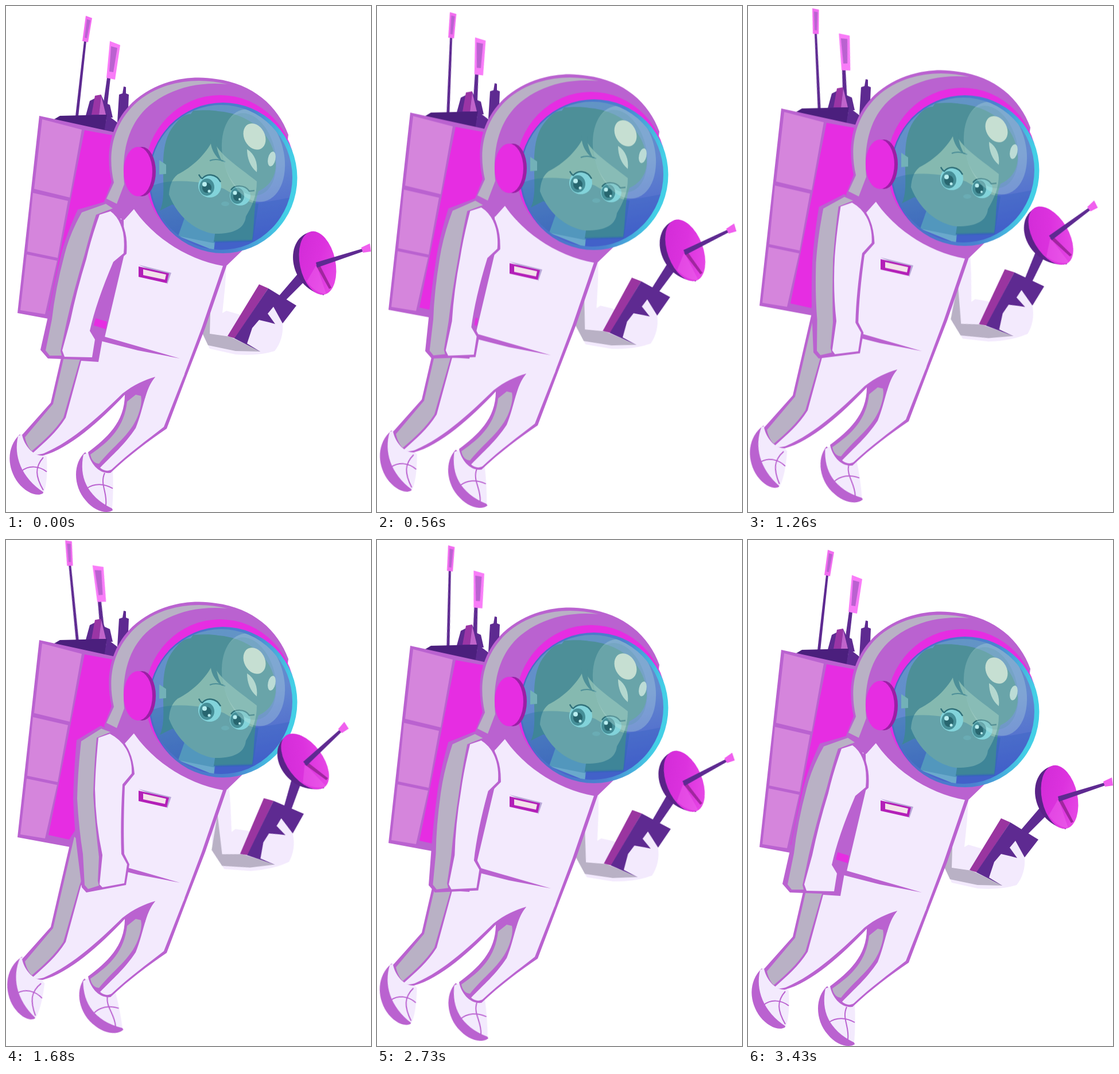
Write an HTML page that moves like this. It is 636x880 px and loops after 3500 ms.

```html
<!DOCTYPE html>
<html lang="en">
<head>
<meta charset="utf-8">
<title>Floating astronaut</title>
<style>
  html, body { margin: 0; width: 100%; height: 100%; overflow: hidden; background: #fff; }
  svg { display: block; width: 100vw; height: 100vh; }

  /* every part swings out and back in 25 held poses each way */
  .float, .turn, .morph { animation: 1750ms steps(25, jump-none) infinite alternate; }
  .float { animation-name: float; }
  .turn { animation-name: turn; }
  @keyframes float { to { transform: translateY(-17px); } }
  @keyframes turn { from { transform: rotate(0deg); } to { transform: rotate(var(--a)); } }

  .rod1 { --a: -12deg; transform-origin: 124px 188px; }
  .rod2 { --a: -12.8deg; transform-origin: 166px 196px; }
  .arm { --a: -8.3deg; transform-origin: 321px 418px; }
  .dish { --a: -16.5deg; transform-origin: 478px 514px; }
  .shoeL { --a: 10deg; transform-origin: 45px 765px; }
  .shoeR { --a: -12deg; transform-origin: 155px 785px; }

  .sleeve { animation-name: sleeve; }
  .shade { animation-name: shade; }
  .front { animation-name: front; }
  @keyframes sleeve {
    from { d: path("M174 340L125 354Q106 395 97 428Q82 490 72 545L60 598L73 613L153 616L160 580L151 563Q162 515 191 447L210 431Q212 405 206 387Q200 364 186 352Z"); }
    to { d: path("M165 340L123 365Q118 420 117 467Q119 520 125 565L132 621L140 630L209 617L215 581L206 563Q204 515 207 445L224 424Q222 400 215 385Q206 364 186 350Z"); }
  }
  @keyframes shade {
    from { d: path("M174 344L132 359Q111 396 102 432Q86 492 80 545L69 599L76 608L97 608L95 600L106 548Q118 495 137 432Q148 390 157 363L186 352Z"); }
    to { d: path("M166 345L131 367Q125 420 124 467Q127 520 134 563L137 617L143 624L162 618L160 610L162 568Q156 520 152 460Q154 400 158 361L182 351Z"); }
  }
  @keyframes front {
    from { d: path("M163 363Q148 405 140 440Q123 495 112 548L98 599L102 610L150 611L155 580L146 565Q157 515 187 445L205 430Q207 410 204 394Q198 368 182 357Z"); }
    to { d: path("M161 361Q156 410 155 450Q156 510 168 565L163 616L168 621L206 614L211 581L201 563Q199 510 203 442L219 423Q220 405 213 388Q204 366 181 354Z"); }
  }
</style>
</head>
<body>
<svg viewBox="0 0 636 880" preserveAspectRatio="none">
  <defs>
    <linearGradient id="glass" x1="0" y1="0" x2="0.2" y2="1">
      <stop offset="0" stop-color="#6299c2"/>
      <stop offset=".55" stop-color="#6388d0"/>
      <stop offset="1" stop-color="#4a62cc"/>
    </linearGradient>
    <linearGradient id="rim" x1="0" y1="0" x2="1" y2=".15">
      <stop offset="0" stop-color="#4c66c4"/>
      <stop offset=".7" stop-color="#4b82d0"/>
      <stop offset="1" stop-color="#43cfe6"/>
    </linearGradient>
    <linearGradient id="bowl" x1="0" y1="0" x2="1" y2="1">
      <stop offset="0" stop-color="#d02ad6"/>
      <stop offset=".5" stop-color="#dc32de"/>
      <stop offset="1" stop-color="#ea50e8"/>
    </linearGradient>
    <clipPath id="visor"><ellipse cx="375" cy="298" rx="124" ry="126"/></clipPath>
  </defs>

  <g class="float">
    <!-- antennas -->
    <g class="turn rod1">
      <path fill="#5e2a91" d="M121 192L126 192L140 61L136 61Z"/>
      <path fill="#f26df0" d="M139 17L150 21L143 63L133 61Z"/>
      <path fill="#ba62d0" d="M141 23L147 25L141 56L137 55Z"/>
    </g>
    <g class="turn rod2">
      <path fill="#5e2a91" d="M166 196L174 196L182 125L176 125Z"/>
      <path fill="#f97cf8" d="M181 61L199 68L190 128L175 125Z"/>
      <path fill="#ba62d0" d="M183 70L194 73L187 115L180 114Z"/>
    </g>

    <!-- backpack -->
    <path fill="#5e2a91" d="M138 194L146 165L154 161L166 155L172 168L181 172L186 194ZM194 202L197 154L203 152L205 140L209 141L209 152L214 154L212 202Z"/>
    <path fill="#9a35a5" d="M149 189L155 156L166 154L162 189Z"/>
    <path fill="#c064cb" d="M162 189L166 156L174 189Z"/>
    <path fill="#4b1f7d" d="M84 197L94 191L176 189L172 220Z"/>
    <path fill="#5e2a91" d="M176 189L205 211L192 224L171 219Z"/>
    <path fill="#ba62d0" d="M58 191L200 222L190 420L112 551L20 534Z"/>
    <path fill="#e62de2" d="M137 216L198 227L180 430L110 538L74 530Z"/>
    <path fill="#d585dc" d="M63 197L132 215L111 333L49 318ZM47 325L108 339L90 438L37 427ZM36 432L89 443L68 536L25 529Z"/>

    <!-- shoes -->
    <g class="turn shoeL">
      <path fill="#ba62d0" d="M24 745C0 768 2 804 21 829C36 848 56 854 65 847L50 770Z"/>
      <path fill="#f3eafd" d="M21 748C13 782 26 820 66 846C72 830 72 806 71 784L45 760L29 744Z"/>
      <path fill="none" stroke="#ba62d0" stroke-width="2" d="M27 809C40 798 58 800 71 810M65 785C50 802 51 818 65 842"/>
    </g>
    <g class="turn shoeR">
      <path fill="#ba62d0" d="M138 776C117 794 116 834 139 860C154 879 176 884 186 877L160 800Z"/>
      <path fill="#f3eafd" d="M135 780C127 818 140 852 185 874C187 852 187 830 186 806L160 785L146 776Z"/>
      <path fill="none" stroke="#ba62d0" stroke-width="2" d="M141 839C154 829 172 831 186 839M172 812C163 832 177 845 174 869"/>
    </g>

    <!-- far arm -->
    <g class="turn arm">
      <path fill="#f3eafd" d="M345 440L384 450L382 485L377 534L384 530L405 536L445 560L478 550Q484 578 468 600Q440 609 400 606L355 596L340 565Z"/>
      <path fill="#b9b1c5" d="M357 500L355 570L390 575L444 601L400 600L352 590L338 560Z"/>
    </g>

    <!-- legs and torso -->
    <path fill="#ba62d0" d="M115 530L78 690L28 746C32 764 46 782 64 782C110 770 164 722 207 676C207 724 175 752 143 776C147 796 162 814 182 812C216 780 248 757 280 735L316 640L347 560L385 450L300 390L222 348L200 372L150 520Z"/>
    <path fill="#b9b1c5" d="M119 533L82 692L33 750C35 760 40 770 45 774C66 756 84 740 100 716L128 618L150 560Z"/>
    <path fill="#f3eafd" d="M131 617L104 716C88 742 68 758 46 778C52 781 60 780 66 778C118 756 168 708 203 674C222 659 242 650 260 645C242 666 240 700 226 734C206 764 186 780 164 803C170 808 177 810 184 806C216 776 246 755 275 732L311 640L303 612L168 580L161 619Z"/>
    <path fill="#f3eafd" d="M205 372L222 352C258 405 320 442 378 452L341 560L309 645L300 613L172 576L206 432Z"/>
    <path fill="#ba62d0" d="M168 574L303 613L230 599L167 583Z"/>
    <path fill="#e62de2" d="M150 541L176 549L174 562L148 554Z"/>
    <path fill="#ba62d0" d="M207 676L260 645Q247 660 242 682L230 690L209 690Z"/>
    <path fill="#b9b1c5" d="M211 688L226 676L235 678Q238 690 230 712C218 745 186 766 162 796Q150 795 147 780C182 756 206 732 211 688Z"/>
    <path fill="#b9a8d8" d="M231 450L288 464L281 484L276 470Z"/>
    <path fill="#b31fb8" d="M231 453L284 465L280 482L231 471Z"/>
    <path fill="#f3e2ea" d="M239 458L279 467L277 476L239 468Z"/>

    <!-- helmet -->
    <path fill="#ba62d0" d="M171 340L184 306C173 258 180 207 220 168C262 129 320 119 366 127C430 135 474 174 492 224L470 385L412 425L385 451C322 442 256 404 224 352L206 372L180 362Z"/>
    <path fill="#b9b1c5" d="M175 335L188 307C177 260 184 210 224 171C264 134 325 121 386 136C330 131 285 145 250 173C212 205 201 255 206 310L193 344Z"/>
    <ellipse fill="#e62de2" cx="373" cy="290" rx="131" ry="135"/>
    <ellipse fill="url(#rim)" cx="378" cy="299" rx="129.500" ry="131"/>
    <g clip-path="url(#visor)">
      <rect fill="url(#glass)" x="245" y="165" width="265" height="265"/>
      <!-- collar and hair -->
      <path fill="#6aa9cc" d="M300 400L312 366L368 388L362 425Z"/>
      <path fill="#4d8f98" d="M268 356C284 325 261 255 288 214C305 190 315 188 322 188L326 182C345 181 360 181 370 183C422 187 469 222 470 276C470 300 456 315 440 322C430 350 434 380 429 408L362 410L365 390L290 345Z"/>
      <path fill="#72b1b8" d="M267 268L279 276L279 292L267 293Z"/>
      <!-- face -->
      <path fill="#85b9b0" d="M299 293C325 280 348 258 361 232C370 258 402 277 437 305C437 330 430 345 418 366C416 384 402 397 362 396C325 390 297 362 284 328C285 314 288 302 299 293Z"/>
      <path fill="#4d8f98" d="M357 225C354 246 364 262 377 271C367 252 365 240 368 225Z"/>
      <path fill="none" stroke="#4d8f98" stroke-width="2" d="M355 269Q367 264 382 271"/>
      <!-- tinted lower glass -->
      <path fill="#1c6f98" fill-opacity=".3" d="M245 318C275 298 340 302 380 318C410 336 425 342 440 344L430 410L360 412L300 400L245 440Z"/>
      <path fill="#2f5cc0" fill-opacity=".3" d="M435 342C458 341 485 335 510 330L510 440L365 440L362 408L429 406Z"/>
      <!-- eyes -->
      <g fill="#82d3da">
        <ellipse cx="355" cy="313" rx="20" ry="20"/>
        <ellipse cx="408" cy="330" rx="18" ry="17"/>
      </g>
      <g fill="#468f98">
        <ellipse cx="350" cy="315" rx="13" ry="15"/>
        <ellipse cx="403" cy="330" rx="12" ry="14"/>
      </g>
      <g fill="#28666f">
        <ellipse cx="350" cy="316" rx="8" ry="9"/>
        <ellipse cx="403" cy="331" rx="7" ry="8"/>
      </g>
      <g fill="#b9eef0">
        <circle cx="346" cy="310" r="4"/><circle cx="354" cy="322" r="2.500"/>
        <circle cx="399" cy="325" r="3.500"/><circle cx="407" cy="336" r="2"/>
      </g>
      <path fill="none" stroke="#2f6f78" stroke-width="2.500" d="M336 293Q339 299 342 300C350 291 366 291 374 306M392 320C398 311 416 310 424 322L433 321"/>
      <ellipse fill="#72bcc4" cx="382" cy="344" rx="7" ry="4" opacity=".4"/>
      <!-- reflections -->
      <ellipse fill="#bfe3dc" fill-opacity=".3" cx="431" cy="260" rx="53" ry="82" transform="rotate(-14 431 260)"/>
      <ellipse fill="#4d8f98" fill-opacity=".2" cx="423" cy="258" rx="46" ry="73" transform="rotate(-14 423 258)"/>
      <ellipse fill="#c6dfd2" cx="433" cy="227" rx="18" ry="24" transform="rotate(-28 433 227)"/>
      <ellipse fill="#bcdcd6" cx="463" cy="266" rx="6.500" ry="13" transform="rotate(12 463 266)"/>
      <path fill="#b4d8cf" d="M420 249C433 257 439 272 437 289C425 279 420 264 420 249Z"/>
    </g>
    <ellipse fill="#9a1fa5" cx="237" cy="288" rx="24" ry="43"/>
    <ellipse fill="#e62de2" cx="230" cy="288" rx="25" ry="43"/>

    <!-- near arm -->
    <path class="morph sleeve" fill="#ba62d0"/>
    <path class="morph shade" fill="#b9b1c5"/>
    <path class="morph front" fill="#f3eafd"/>

    <!-- handset -->
    <g class="turn arm">
      <g class="turn dish">
        <path fill="#5e2a91" d="M474 506L486 513L524 475L510 464Z"/>
        <path fill="#5a2388" d="M535 392C482 400 490 490 554 503Z"/>
        <ellipse fill="url(#bowl)" cx="543" cy="447" rx="31" ry="56" transform="rotate(-12 543 447)"/>
        <path fill="#f37df0" fill-opacity=".3" d="M541 450L524 479Q538 499 558 501Z"/>
        <path fill="#a0269f" d="M540 451L546 449L567 490L563 492Z"/>
        <path fill="#5e2a91" d="M540 446L621 422L622 427L542 455Z"/>
        <path fill="#f05fee" d="M619 420L634 413L636 427L622 429Z"/>
      </g>
      <path fill="#9a35a0" d="M441 484L457 491L399 578L386 574Z"/>
      <path fill="#5e2a91" d="M457 491L506 521L482 552L443 601L398 578Z"/>
      <path fill="#f3eafd" d="M420 587L429 560L441 546L458 550L469 553L456 535L466 523L482 552Q484 580 468 600L443 601Z"/>
    </g>
  </g>
</svg>
</body>
</html>
```
